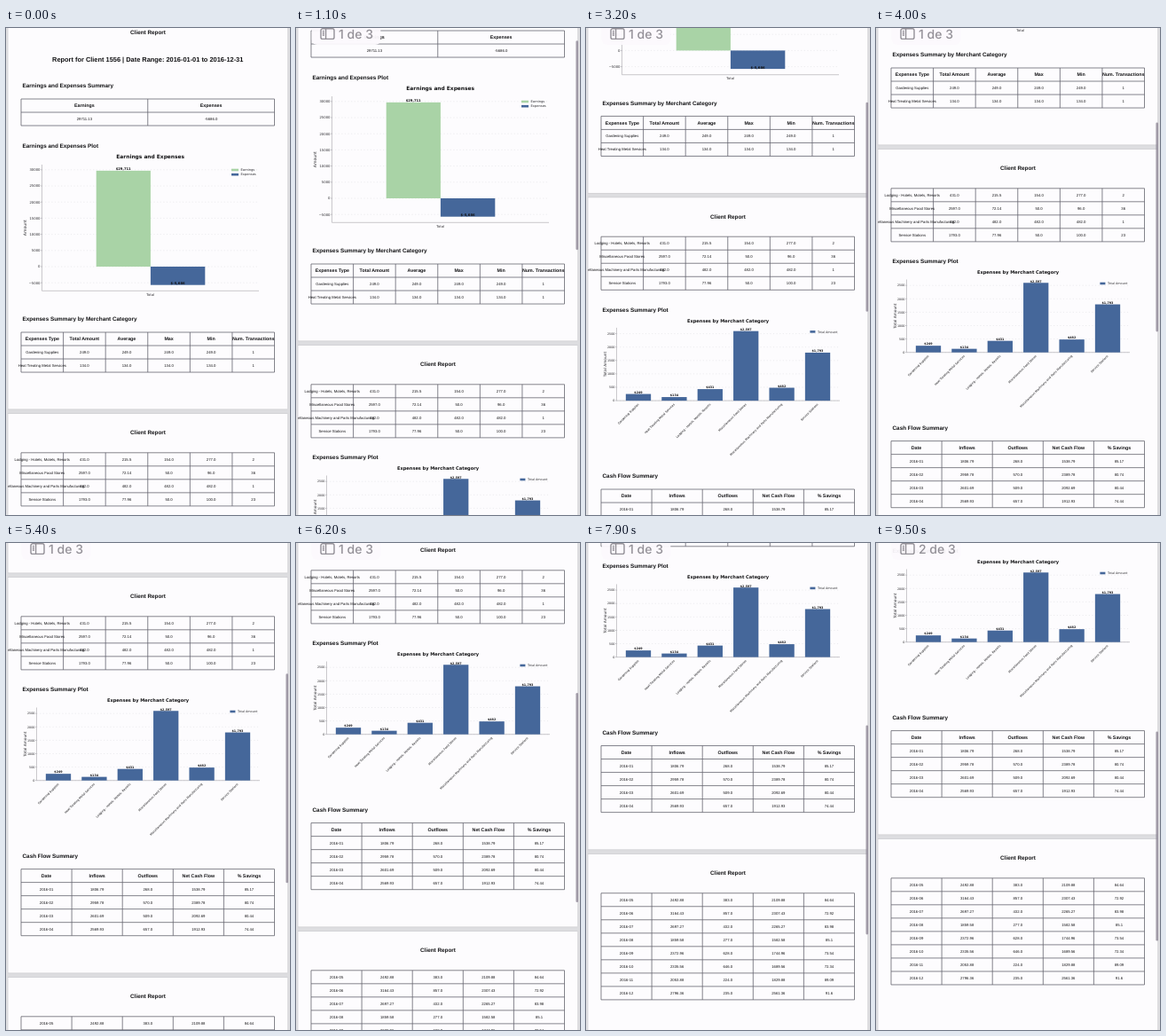
An HTML page for the animation above (9600 ms loop, 320 by 549 pixels).

```html
<!DOCTYPE html>
<html lang="es">
<head>
<meta charset="utf-8">
<title>Client Report</title>
<style>
  html, body { margin: 0; width: 100%; height: 100%; overflow: hidden; background: #dddde0; }
  svg { display: block; width: 320px; height: 549px; text-rendering: geometricPrecision; }
  .pdf { font-family: "Liberation Sans", Arial, sans-serif; }
  .plot { font-family: "DejaVu Sans", sans-serif; }
  .badge { font-family: Inter, sans-serif; }
</style>
</head>
<body>
<svg id="stage" viewBox="0 0 320 549">
  <defs><clipPath id="sheet"><rect x="2" y="-20" width="315.5" height="1400"/></clipPath></defs>
  <g id="doc" clip-path="url(#sheet)"></g>
  <rect id="thumb" x="315.4" width="2.6" height="236" rx="1.3" fill="#8d8695" opacity="0"/>
  <g id="badge" class="badge" opacity="0">
    <rect x="17.8" y="-7" width="77.5" height="26" rx="6" fill="#fcf9fd" opacity=".95"/>
    <g fill="none" stroke="#939097" stroke-width="1.4">
      <rect x="28" y=".8" width="15" height="11.6" rx="2"/>
      <path d="M33.6 .8V12.4M29.8 3.6h2.2M29.8 5.8h2.2M29.8 8h2.2"/>
    </g>
    <text id="count" x="48" y="11.6" font-size="14" font-weight="500" fill="#939097">1 de 3</text>
  </g>
</svg>
<script>
const NS = 'http://www.w3.org/2000/svg';
const $ = id => document.getElementById(id);
const doc = $('doc');

const LEFT = 17, WIDTH = 285.5, ROW = 15.02;
const INK = '#121214', SOFT = '#2a2a2e', LINE = '#65656f', GREEN = '#a9d3a6', BLUE = '#45679a';

function add(parent, tag, attrs, content) {
  const el = document.createElementNS(NS, tag);
  for (const k in attrs) el.setAttribute(k, attrs[k]);
  if (content !== undefined) el.textContent = content;
  parent.appendChild(el);
  return el;
}

// Text centred vertically on y
function text(parent, str, x, y, size, opts = {}) {
  return add(parent, 'text', {
    x, y: y + size * 0.36, 'font-size': size, 'text-anchor': 'middle', fill: INK, ...opts
  }, str);
}

const bold = { 'font-weight': 700 };
const pdf = add(doc, 'g', { class: 'pdf' });
const plots = add(doc, 'g', { class: 'plot' });

function heading(str, y) {
  text(pdf, str, 18.5, y, 6.36, { ...bold, 'text-anchor': 'start' });
}

function table(top, rows, hasHead) {
  const cols = rows[0].length, w = WIDTH / cols, bottom = top + rows.length * ROW;
  let d = '';
  for (let r = 0; r <= rows.length; r++) d += `M${LEFT} ${top + r * ROW}h${WIDTH}`;
  for (let c = 0; c <= cols; c++) d += `M${LEFT + c * w} ${top}V${bottom}`;
  add(pdf, 'path', { d, fill: 'none', stroke: LINE, 'stroke-width': 0.8 });
  rows.forEach((row, r) => row.forEach((cell, c) => {
    const head = hasHead && r === 0;
    text(pdf, cell, LEFT + (c + 0.5) * w, top + (r + 0.5) * ROW, head ? 5.3 : 4.24, head ? bold : {});
  }));
}

function axes({ x0, x1, top, bottom, zero, unit, ticks, size, label, labelX, labelSize, title, titleX, titleY, titleSize }) {
  text(plots, title, titleX, titleY, titleSize, bold);
  for (const v of ticks) {
    const y = zero - v * unit;
    add(plots, 'path', { d: `M${x0} ${y}H${x1}`, stroke: '#dadade', 'stroke-width': 0.5, 'stroke-dasharray': '1.2 2.4' });
    add(plots, 'path', { d: `M${x0 - 1.4} ${y}h1.4`, stroke: LINE, 'stroke-width': 0.4 });
    text(plots, String(v).replace('-', '\u2212'), x0 - 2, y, size, { 'text-anchor': 'end', fill: SOFT });
  }
  add(plots, 'path', { d: `M${x0} ${top}V${bottom}H${x1}`, fill: 'none', stroke: '#b4b2b6', 'stroke-width': 0.7 });
  const my = (top + bottom) / 2;
  text(plots, label, labelX, my, labelSize, { transform: `rotate(-90 ${labelX} ${my})`, fill: SOFT });
}

function bar(x, w, y0, y1, fill) {
  add(plots, 'rect', { x, y: Math.min(y0, y1), width: w, height: Math.abs(y1 - y0), fill });
}

function legend(str, x, y, w, fill, size) {
  add(plots, 'rect', { x, y: y - 1.3, width: w, height: 2.6, fill });
  text(plots, str, x + w + 2.6, y, size, { 'text-anchor': 'start', fill: SOFT });
}

// Pages
for (let p = 0; p < 3; p++) {
  const top = -16.5 + p * 451;
  add(pdf, 'rect', { x: 2, y: top, width: 315.5, height: 446.4, fill: '#fdfcfe', stroke: '#c9c9cd', 'stroke-width': 0.7 });
}
for (let p = 0; p < 3; p++) text(pdf, 'Client Report', 160, 5 + p * 451, 6.36, bold);
text(pdf, 'Report for Client 1556 | Date Range: 2016-01-01 to 2016-12-31', 159.7, 35, 7.42, bold);

// Earnings and expenses
heading('Earnings and Expenses Summary', 65);
table(80, [['Earnings', 'Expenses'], ['29711.13', '-5686.0']], true);
heading('Earnings and Expenses Plot', 132.3);

const U1 = 18.2 / 5000, Z1 = 269;
axes({
  x0: 40.5, x1: 285, top: 154, bottom: 296.3, zero: Z1, unit: U1,
  ticks: [-5000, 0, 5000, 10000, 15000, 20000, 25000, 30000], size: 3.8,
  label: 'Amount', labelX: 21.5, labelSize: 4.6,
  title: 'Earnings and Expenses', titleX: 162.7, titleY: 145.3, titleSize: 5.9
});
bar(101.7, 61.2, Z1, Z1 - 29711 * U1, GREEN);
bar(162.9, 61.4, Z1, Z1 + 5686 * U1, BLUE);
text(plots, '$29,711', 132.2, 158.7, 3.75, bold);
text(plots, '$-5,686', 193.6, 288, 3.75, bold);
text(plots, 'Total', 162.8, 300.6, 3.8, { fill: SOFT });
legend('Earnings', 254, 160, 8, GREEN, 3.6);
legend('Expenses', 254, 165.2, 8, BLUE, 3.6);

// Merchant categories
const merchants = [
  ['Gardening Supplies', '249.0', '249.0', '249.0', '249.0', '1'],
  ['Heat Treating Metal Services', '134.0', '134.0', '134.0', '134.0', '1'],
  ['Lodging - Hotels, Motels, Resorts', '431.0', '215.5', '154.0', '277.0', '2'],
  ['Miscellaneous Food Stores', '2597.0', '72.14', '50.0', '96.0', '36'],
  ['Miscellaneous Machinery and Parts Manufacturing', '482.0', '482.0', '482.0', '482.0', '1'],
  ['Service Stations', '1793.0', '77.96', '50.0', '100.0', '23']
];
heading('Expenses Summary by Merchant Category', 328.2);
table(343, [['Expenses Type', 'Total Amount', 'Average', 'Max', 'Min', 'Num. Transactions'], ...merchants.slice(0, 2)], true);
table(478.8, merchants.slice(2), false);
heading('Expenses Summary Plot', 561.2);

const U2 = 15.1 / 500, Z2 = 663.7;
axes({
  x0: 34.5, x1: 286, top: 581.5, bottom: Z2, zero: Z2, unit: U2,
  ticks: [0, 500, 1000, 1500, 2000, 2500], size: 3.35,
  label: 'Total Amount', labelX: 21, labelSize: 4.3,
  title: 'Expenses by Merchant Category', titleX: 160, titleY: 573.3, titleSize: 5.07
});
merchants.forEach(([name, total], i) => {
  const x = 59 + i * 40.4, y = Z2 - total * U2, ty = Z2 + 3.6;
  bar(x - 14.15, 28.3, Z2, y, BLUE);
  text(plots, '$' + Number(total).toLocaleString('en-US'), x, y - 1.9, 3.35, bold);
  text(plots, name, x, ty, 3.28, { 'text-anchor': 'end', transform: `rotate(-45 ${x} ${ty})` });
});
legend('Total Amount', 252.4, 586, 6, BLUE, 3.4);

// Cash flow: [inflow, outflow] by month
const flows = [
  [1806.79, 268], [2959.78, 570], [2601.69, 509], [2569.93, 657], [2492.88, 383], [3164.43, 857],
  [2697.27, 432], [1859.58, 277], [2372.96, 628], [2335.56, 646], [2053.88, 224], [2796.36, 235]
].map(([a, b], i) => [
  '2016-' + String(i + 1).padStart(2, '0'), a.toFixed(2), b.toFixed(1), (a - b).toFixed(2),
  String(Math.round((a - b) / a * 1e4) / 100)
]);
heading('Cash Flow Summary', 748.7);
table(763.6, [['Date', 'Inflows', 'Outflows', 'Net Cash Flow', '% Savings'], ...flows.slice(0, 4)], true);
table(929.8, flows.slice(4), false);

// Scroll keys: time ms, offset px, speed px/s
const keys = [
  [0, 0, 60], [1100, 77, 80], [2400, 186, 78], [4000, 298, 70],
  [5400, 396, 66], [7000, 496, 56], [9000, 552, 0]
];
const LOOP = 9600, STEP = 100;

function scrollAt(t) {
  if (t >= 9000) return 552;
  const i = keys.findIndex(k => k[0] > t) - 1;
  const [t0, p0, v0] = keys[i], [t1, p1, v1] = keys[i + 1];
  const d = t1 - t0, u = (t - t0) / d, w = 1 - u;
  return p0 * (1 + 2 * u) * w * w + p1 * u * u * (3 - 2 * u)
    + d / 1000 * (v0 * u * w * w - v1 * u * u * w);
}

function draw(now) {
  const t = Math.floor(now % LOOP / STEP) * STEP;
  const s = scrollAt(t), fade = Math.min(1, t / 300);
  doc.setAttribute('transform', `translate(0 ${-s})`);
  $('thumb').setAttribute('y', -18 + s * 0.4175);
  $('thumb').setAttribute('opacity', fade * 0.8);
  $('badge').setAttribute('opacity', fade);
  $('count').textContent = (t < 8000 ? 1 : 2) + ' de 3';
}

let start;
function tick(now) {
  start ??= now;
  draw(Math.max(0, now - start));
  requestAnimationFrame(tick);
}
draw(0);
requestAnimationFrame(tick);
</script>
</body>
</html>
```
